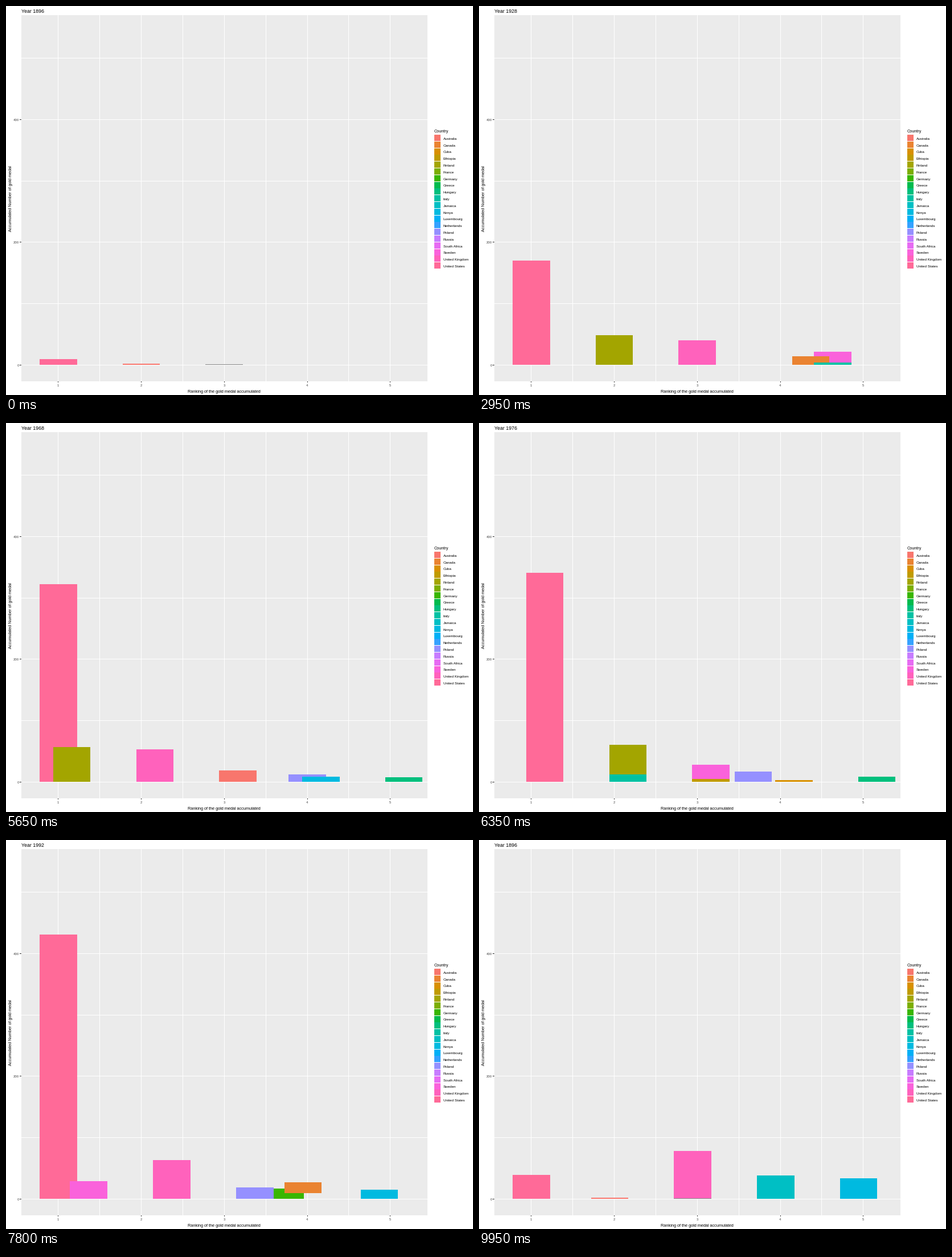
A matplotlib script for the animation above (10000 ms loop, 820 px wide and 683 px high).

```python
import matplotlib.pyplot as plt
from matplotlib.animation import FuncAnimation
from matplotlib.patches import Rectangle

W, H, DPI = 820, 683, 100
FRAMES, INTERVAL = 200, 50
LEFT, TOP, RIGHT, BOTTOM = 27, 16, 740, 659
UNIT_X, UNIT_Y = 145.75, 1.0763
BAR_W = 0.45 * UNIT_X

COUNTRIES = {
    "AU": ("Australia", "#F8766D"), "CA": ("Canada", "#EA8331"),
    "CU": ("Cuba", "#D89000"), "ET": ("Ethiopia", "#C09B00"),
    "FI": ("Finland", "#A3A500"), "FR": ("France", "#7CAE00"),
    "DE": ("Germany", "#39B600"), "GR": ("Greece", "#00BB4E"),
    "HU": ("Hungary", "#00BF7D"), "IT": ("Italy", "#00C1A3"),
    "JM": ("Jamaica", "#00BFC4"), "KE": ("Kenya", "#00BAE0"),
    "LU": ("Luxembourg", "#00B0F6"), "NL": ("Netherlands", "#35A2FF"),
    "PL": ("Poland", "#9590FF"), "RU": ("Russia", "#C77CFF"),
    "ZA": ("South Africa", "#E76BF3"), "SE": ("Sweden", "#FA62DB"),
    "UK": ("United Kingdom", "#FF62BC"), "US": ("United States", "#FF6A98"),
}
ORDER = list(COUNTRIES)

# accumulated gold medals of each year's leading winners, one line per games
MEDALS = """
US9 AU2 GR1
US25 UK7 AU3 CA1 HU1 LU1
US52 UK8 CA2
US63 UK11 CA3 GR2 SE2
US80 UK22 CA4 SE4 ZA1
US104 UK27 SE19 FI7 CA5
US121 UK34 SE20 FI18 CA6
US139 FI41 UK37 AU4 IT3
US154 FI46 UK39 SE21 CA13
US179 FI49 UK41 CA14 IT4
US199 FI52 UK46 DE6 IT5
US217 FI53 SE26 NL7 IT6
US237 SE27 AU8 IT7
US259 UK47 AU15 FR6
US277 UK48 AU16 DE11 IT8
US297 FI54 UK52 AU17 DE13
US321 UK53 AU19 PL12 HU7
US329 FI57 UK53 PL13 KE8
US341 FI60 SE28 PL16 HU8
UK58 PL18 IT12 ET5 CU3
US374 FI61 UK61 AU20 IT15
US395 AU21 IT16 KE13
US421 UK63 DE16 CA15 KE15
US449 SE29 CA21 PL19 DE18
US466 UK65 PL23 AU22 DE20
US481 UK71 SE32 PL24 KE19
US496 UK72 KE25 PL25 AU23
US517 UK76 RU29 JM27 KE27
US543 UK78 JM38 KE33 PL27
""".split("\n")[1:-1]

YEARS = sorted({*range(1896, 2017, 4), 1906} - {1916, 1940, 1944})


def layout(line):
    """Map each country to (rank, base, top); ties share a rank and stack."""
    totals = {item[:2]: int(item[2:]) for item in line.split()}
    bars = {}
    for code, n in totals.items():
        above = sum(v > n for v in totals.values())
        tied = [c for c, v in totals.items() if v == n]
        below = sum(ORDER.index(c) > ORDER.index(code) for c in tied)
        bars[code] = (above + (len(tied) + 1) / 2, below * n, (below + 1) * n)
    return bars


STATES = [layout(line) for line in MEDALS]
SHORT = {0, 26, 28}
TIMELINE = [(s, k, 6 if s in SHORT else 7)
            for s in range(len(STATES)) for k in range(6 if s in SHORT else 7)]


def ease(t):
    return 2 * t * t if t < 0.5 else 1 - 2 * (1 - t) ** 2


def mix(a, b, p):
    return tuple(u + (v - u) * p for u, v in zip(a, b))


def shift(bar, dx):
    return (bar[0] + dx, bar[1], bar[2])


def blend(old, new, p):
    """Leaving bars drift right, staying bars move, arriving ones drift in."""
    leaving = [(c, shift(b, p)) for c, b in old.items() if c not in new]
    staying = [(c, mix(b, new[c], p)) for c, b in old.items() if c in new]
    arriving = [(c, shift(b, p - 1)) for c, b in new.items() if c not in old]
    return leaving + staying + (arriving if p > 0 else [])


def px(rank):
    return 91.75 + (rank - 1) * UNIT_X


def py(value):
    return 630 - value * UNIT_Y


plt.rcParams["font.family"] = "Liberation Sans"
# the small margin keeps the pixel size from rounding down
fig = plt.figure(figsize=((W + 0.01) / DPI, (H + 0.01) / DPI), dpi=DPI,
                 facecolor="white")
ax = fig.add_axes([0, 0, 1, 1])
ax.set_xlim(0, W)
ax.set_ylim(H, 0)
ax.axis("off")


def box(x, y, w, h, color, z=1):
    return ax.add_patch(Rectangle((x, y), w, h, fc=color, lw=0,
                                  antialiased=False, zorder=z))


def label(x, y, s, size, color="black", ha="left", **kw):
    return ax.text(x, y, s, fontsize=size * 72 / DPI, color=color, ha=ha,
                   va=kw.pop("va", "center_baseline"), **kw)


panel = box(LEFT, TOP, RIGHT - LEFT, BOTTOM - TOP, "#EBEBEB", 0)
for i in range(9):
    box(int(px(1 + i / 2)), TOP, 1, BOTTOM - TOP, "white")
for v in range(0, 501, 100):
    box(LEFT, int(py(v)), RIGHT - LEFT, 1, "white")

for v in (0, 200, 400):
    box(24, int(py(v)), 3, 1, "#333333")
    label(23.3, py(v) + 0.7, str(v), 6.1, "#4D4D4D", "right")
for r in range(1, 6):
    box(int(px(r)), BOTTOM, 1, 2, "#333333")
    label(px(r), 666.3, str(r), 6.1, "#4D4D4D", "center")

label(383, 676, "Ranking of the gold medal accumulated", 7.35, ha="center")
label(8, 338, "Accumulated Number of gold medal", 7.35, ha="center",
      va="center", rotation=90)
title = label(26.7, 8.7, "", 8.8)

label(751.7, 219.5, "Country", 7.3)
for i, (name, color) in enumerate(COUNTRIES.values()):
    y = 226 + 11.8 * i
    box(752, round(y), 11, 11, color)
    label(767.5, y + 6.7, name, 6.3)

pool = [box(0, 0, BAR_W, 0, "white", 2 + i / 100) for i in range(14)]
for bar in pool:
    bar.set_clip_path(panel)


def update(frame):
    s, k, n = TIMELINE[frame]
    after = (s + 1) % len(STATES)
    bars = blend(STATES[s], STATES[after], ease(k / n))
    for patch in pool:
        patch.set_visible(False)
    for patch, (code, (rank, base, top)) in zip(pool, bars):
        # a bar one pixel high reads as a grey line
        thin = top - base < 1.2
        patch.set_facecolor("#858585" if thin else COUNTRIES[code][1])
        patch.set_bounds(px(rank) - BAR_W / 2, py(top),
                         BAR_W, (top - base) * UNIT_Y)
        patch.set_visible(True)
    title.set_text(f"Year {YEARS[after if k > (n + 1) / 2 else s]}")
    return pool + [title]


anim = FuncAnimation(fig, update, frames=FRAMES, interval=INTERVAL,
                     repeat=True, repeat_delay=0, blit=False)
plt.show()
```
